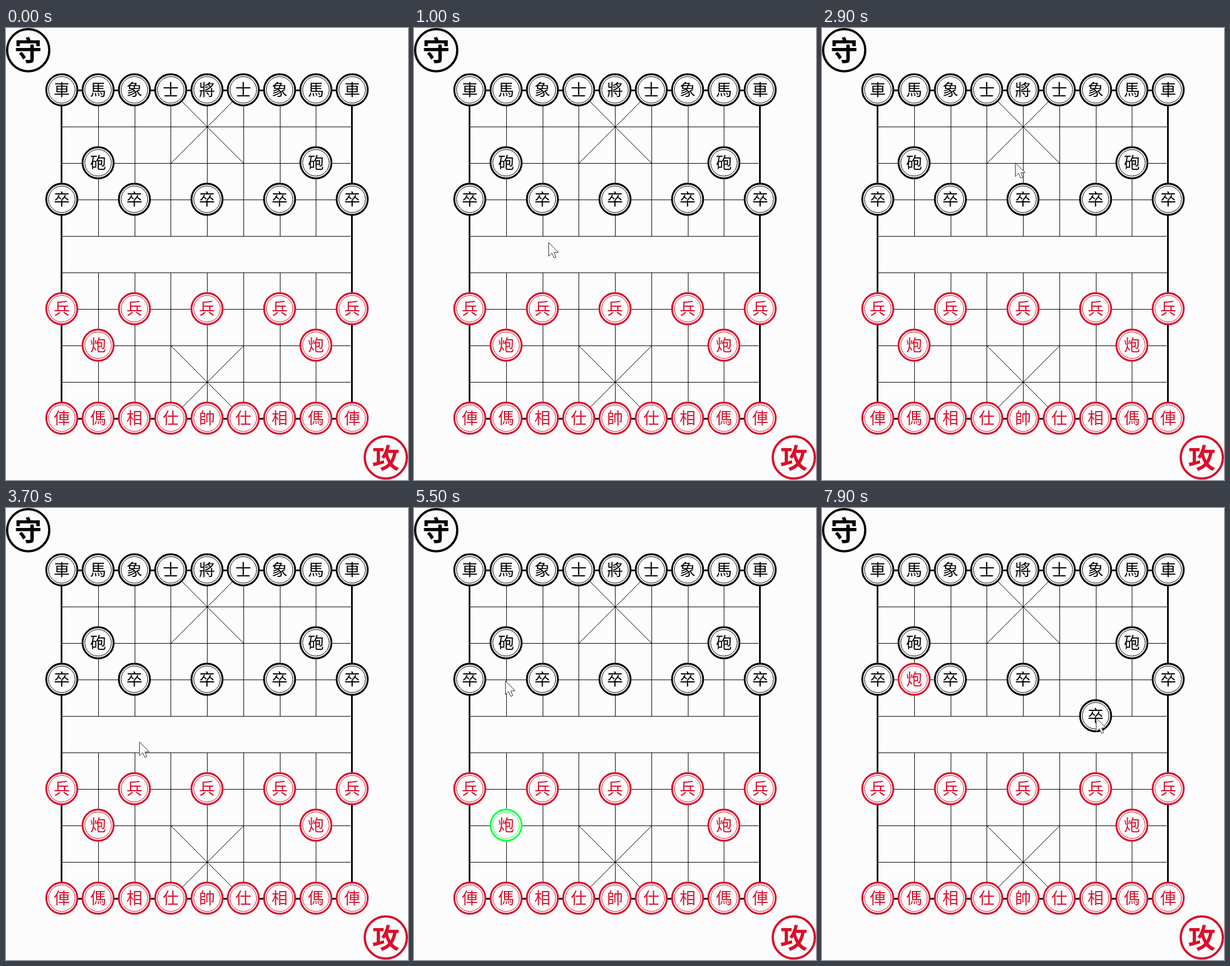
These frames come from a looping animation (706 px wide and 793 px high, 8000 ms). An HTML page with a canvas:

```html
<!DOCTYPE html>
<html lang="zh-Hant">
<head>
<meta charset="utf-8">
<style>
html, body { margin: 0; width: 706px; height: 793px; overflow: hidden; background: #fcfcfc; }
canvas { display: block; }
</style>
</head>
<body>
<canvas id="board" width="706" height="793"></canvas>
<script>
const ctx = document.getElementById('board').getContext('2d');
const LOOP = 8000, STEP = 100;
const PAPER = '#fcfcfc', BLACK = '#040404', RED = '#d8102c', GREEN = '#1cff50';
const SELECT_RED = 4300, MOVE_RED = 5700, SELECT_BLACK = 7200, MOVE_BLACK = 7900;
const CURSOR_IN = 300;

// Cursor path: time, x, y
const path = [
  [300, 248, 270], [500, 255, 303], [1800, 197, 524], [2900, 339, 236], [3000, 339, 236],
  [4300, 151, 548], [4500, 149, 542], [5500, 160, 303], [5900, 160, 303],
  [6700, 519, 213], [7150, 476, 300], [7300, 476, 300], [7700, 481, 368], [8000, 481, 368]
];
const arrow = [[0, 0], [0, 24], [5.5, 18.5], [9.5, 27], [13, 25.5], [9.5, 17.5], [17, 17]];

// Piece centres, and the pixel-aligned grid lines beside them
const colX = c => 98 + 63.75 * c;
const rowY = r => 108.5 + 64 * r;
const lineX = c => Math.round(colX(c)) + .5;
const lineY = r => rowY(r) + 1;

const pieces = [];
function addRow(color, row, glyphs) {
  [...glyphs].forEach((glyph, col) => {
    if (glyph !== ' ') pieces.push({ color, row, col, glyph });
  });
}
addRow(BLACK, 0, '車馬象士將士象馬車');
addRow(BLACK, 2, ' 砲     砲 ');
addRow(BLACK, 3, '卒 卒 卒 卒 卒');
addRow(RED, 6, '兵 兵 兵 兵 兵');
addRow(RED, 7, ' 炮     炮 ');
addRow(RED, 9, '俥傌相仕帥仕相傌俥');
const pieceAt = (col, row) => pieces.find(p => p.col === col && p.row === row);
const cannon = pieceAt(1, 7), soldier = pieceAt(6, 3);

function line(x1, y1, x2, y2, width = 1) {
  ctx.lineWidth = width;
  ctx.beginPath();
  ctx.moveTo(x1, y1);
  ctx.lineTo(x2, y2);
  ctx.stroke();
}

function ring(x, y, r, width, color) {
  ctx.beginPath();
  ctx.arc(x, y, r, 0, 2 * Math.PI);
  ctx.fillStyle = PAPER;
  ctx.fill();
  ctx.lineWidth = width;
  ctx.strokeStyle = color;
  ctx.stroke();
}

function label(glyph, x, y, size, weight, color) {
  ctx.font = `${weight} ${size}px "Noto Sans CJK TC", "Noto Sans CJK", sans-serif`;
  ctx.textAlign = 'center';
  ctx.fillStyle = color;
  ctx.fillText(glyph, x, y + size * .38);
}

function drawGrid() {
  ctx.strokeStyle = BLACK;
  const [left, right, top, bottom] = [lineX(0), lineX(8), lineY(0), lineY(9)];
  for (let r = 0; r < 10; r++) line(left, lineY(r), right, lineY(r), r % 9 ? 1 : 3);
  for (let c = 1; c < 8; c++) {
    line(lineX(c), top, lineX(c), lineY(4));
    line(lineX(c), lineY(5), lineX(c), bottom);
  }
  line(left - 1, top, left - 1, bottom, 3);
  line(right - 1, top, right - 1, bottom, 3);
  for (const r of [0, 7]) {
    line(lineX(3), lineY(r), lineX(5), lineY(r + 2));
    line(lineX(5), lineY(r), lineX(3), lineY(r + 2));
  }
}

function drawPiece({ color, row, col, glyph }, selected) {
  const x = colX(col), y = rowY(row), edge = selected ? GREEN : color;
  ring(x, y, 27.3, 3.2, edge);
  ring(x, y, 23.3, 1, edge);
  label(glyph, x, y - .5, 28, 400, color);
}

function drawBadge(x, y, color, attacking) {
  ring(x, y, 37, 4, color);
  label(attacking ? '攻' : '守', x, y, 48, 700, color);
}

function drawCursor(t) {
  const i = path.findIndex(p => p[0] > t);
  const [t0, x0, y0] = path[i - 1], [t1, x1, y1] = path[i];
  const u = (t - t0) / (t1 - t0), k = u * u * (3 - 2 * u);
  const x = Math.round(x0 + (x1 - x0) * k) + .5;
  const y = Math.round(y0 + (y1 - y0) * k) + .5;
  ctx.beginPath();
  for (const [dx, dy] of arrow) ctx.lineTo(x + dx, y + dy);
  ctx.closePath();
  ctx.fillStyle = PAPER;
  ctx.fill();
  ctx.lineWidth = 1;
  ctx.strokeStyle = '#303038';
  ctx.stroke();
}

function draw(now) {
  const t = Math.floor(now % LOOP / STEP) * STEP;
  ctx.fillStyle = PAPER;
  ctx.fillRect(0, 0, 706, 793);
  drawGrid();
  cannon.row = t < MOVE_RED ? 7 : 3;
  soldier.row = t < MOVE_BLACK ? 3 : 4;
  const selected = t >= SELECT_RED && t < MOVE_RED ? cannon
    : t >= SELECT_BLACK && t < MOVE_BLACK ? soldier : null;
  for (const piece of pieces) drawPiece(piece, piece === selected);
  const blackTurn = t >= MOVE_RED && t < MOVE_BLACK;
  drawBadge(39, 39, BLACK, blackTurn);
  drawBadge(667, 753.5, RED, !blackTurn);
  if (t >= CURSOR_IN) drawCursor(t);
}

let start;
function tick(now) {
  start ??= now;
  draw(now - start);
  requestAnimationFrame(tick);
}
draw(0);
requestAnimationFrame(tick);
</script>
</body>
</html>
```
